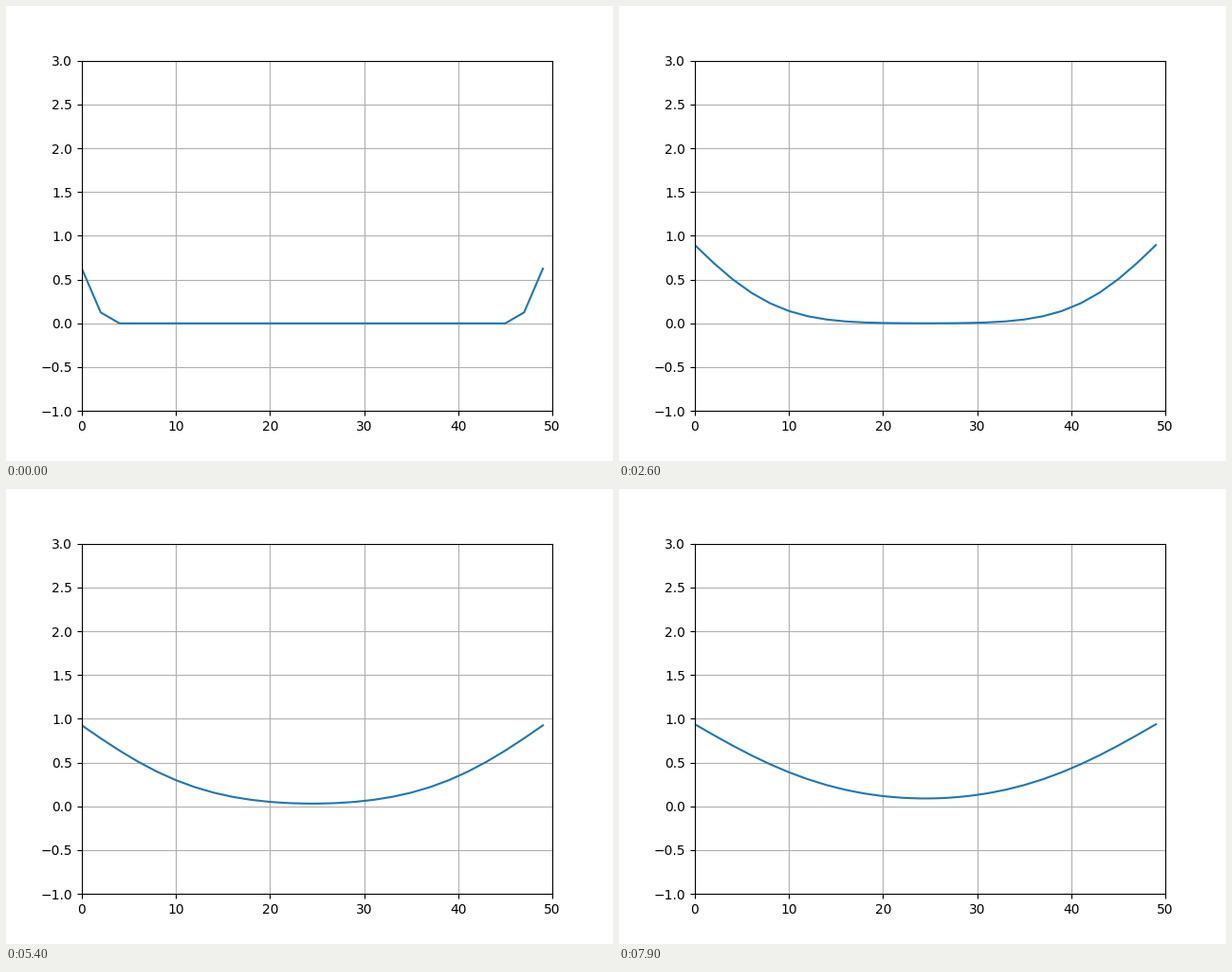
Animation, 640 px wide and 480 px high, one loop 8 s. Source, as a matplotlib script:

```python
import numpy as np
import matplotlib.pyplot as plt
from matplotlib.animation import FuncAnimation

CELLS = 50
FRAMES = 80
STEPS_PER_FRAME = 2
LEAD_STEPS = 4


def diffuse(u, steps):
    """Explicit heat equation at r = 1/2, with both walls held at 1."""
    for _ in range(steps):
        padded = np.pad(u, 1, constant_values=1.0)
        u = (padded[:-2] + padded[2:]) / 2
    return u


states = [diffuse(np.zeros(CELLS), LEAD_STEPS)]
while len(states) < FRAMES:
    states.append(diffuse(states[-1], STEPS_PER_FRAME))

fig, ax = plt.subplots(figsize=(6.4, 4.8), dpi=100)
ax.set_xlim(0, CELLS)
ax.set_ylim(-1, 3)
ax.grid()
line, = ax.plot(np.arange(CELLS), states[0])


def update(frame):
    line.set_ydata(states[frame])
    return line,


anim = FuncAnimation(fig, update, frames=FRAMES, interval=100, repeat=True)
plt.show()
```
